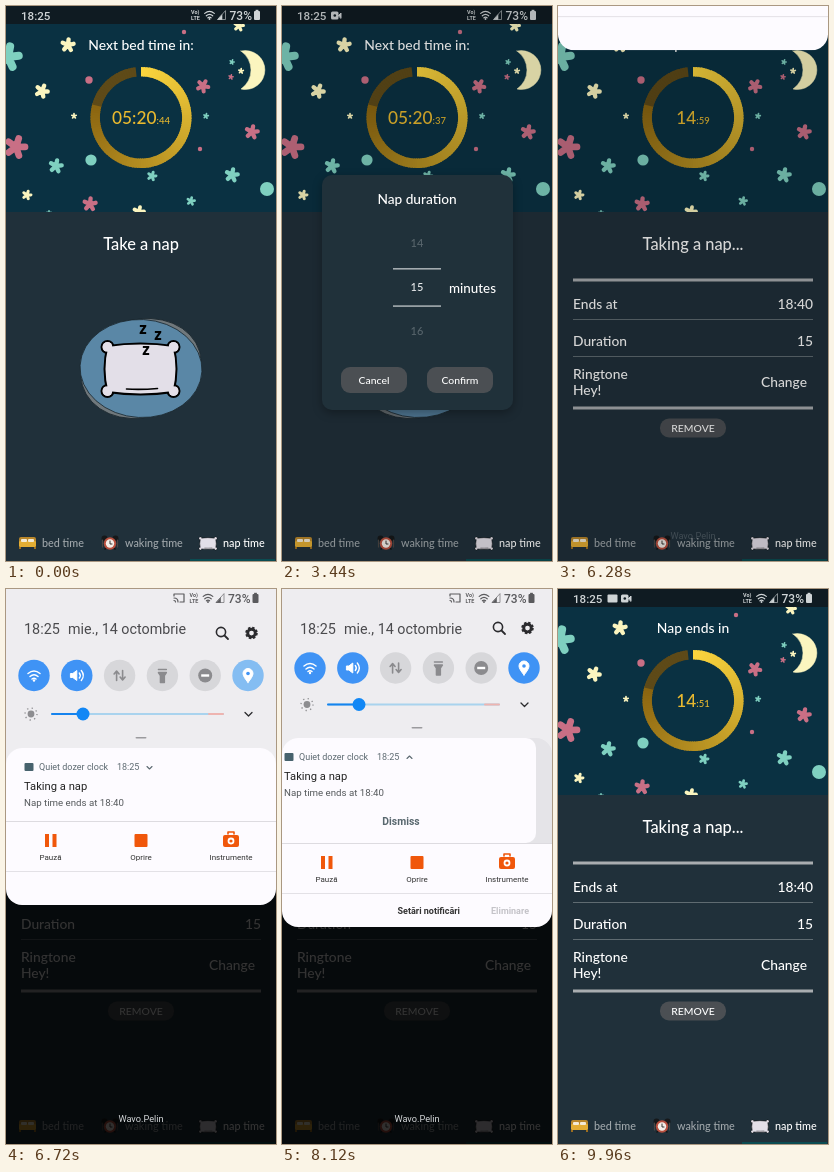
Animation of 270x555 px, one loop 10 s. Source, as an HTML page:

```html
<!DOCTYPE html>
<html lang="en">
<head>
<meta charset="utf-8">
<title>Nap timer</title>
<style>
html, body { margin: 0; width: 100%; height: 100%; overflow: hidden; background: #20303a; }
#stage { display: block; width: 270px; height: 555px; font-family: Lato, sans-serif; font-weight: 500; }
.sys { font-family: Roboto, sans-serif; font-weight: 400; }
.status { font-weight: 500; }
.dialog { filter: drop-shadow(0 3px 5px rgba(0, 0, 0, .3)); }
</style>
</head>
<body>
<svg id="stage" viewBox="0 0 270 555"></svg>
<script>
const LOOP = 10000, SECOND = 480;
const RED = '#c96f85', TEAL = '#7fd0c0', CREAM = '#fbf5bf', ORANGE = '#f0570b', BLUE = '#3f93f5';
const MID = 'text-anchor="middle"', END = 'text-anchor="end"';

// Eased value from a flat list: time, value, time, value, ...
function key(t, ...k) {
  if (t <= k[0]) return k[1];
  for (let i = 2; i < k.length; i += 2) {
    if (t < k[i]) {
      const u = (t - k[i - 2]) / (k[i] - k[i - 2]);
      return k[i - 1] + (k[i + 1] - k[i - 1]) * u * u * (3 - 2 * u);
    }
  }
  return k[k.length - 1];
}

const text = (x, y, s, size, fill = '#fff', more = '') =>
  `<text x="${x}" y="${y}" font-size="${size}" fill="${fill}" ${more}>${s}</text>`;
const rect = (x, y, w, h, fill, r = 0, more = '') =>
  `<rect x="${x}" y="${y}" width="${w}" height="${h}" rx="${r}" fill="${fill}" ${more}/>`;
const circle = (x, y, r, fill, more = '') => `<circle cx="${x}" cy="${y}" r="${r}" fill="${fill}" ${more}/>`;
const path = (d, stroke, w = 1, fill = 'none', more = '') =>
  `<path d="${d}" stroke="${stroke}" stroke-width="${w}" fill="${fill}" stroke-linecap="round" stroke-linejoin="round" ${more}/>`;
const group = (s, more) => `<g ${more}>${s}</g>`;
const at = (x, y, s, k = 1) => group(s, `transform="translate(${x} ${y}) scale(${k})"`);
const fade = (o, s) => o > 0 ? group(s, `opacity="${o}"`) : '';

// Five thick rounded arms
function star(x, y, r, color, turn = 0) {
  let d = '';
  for (let i = 0; i < 5; i++) {
    const a = i * Math.PI * .4 + turn;
    d += `M${x} ${y}L${(x + r * .72 * Math.sin(a)).toFixed(1)} ${(y - r * .72 * Math.cos(a)).toFixed(1)}`;
  }
  return path(d, color, r * .54);
}

const wifi = c => path('M-6 -2Q0 -7 6 -2M-4 1Q0 -2.5 4 1M-2 3.5Q0 2 2 3.5', c, 1.5) + circle(0, 5, 1.2, c);
const camera = c => rect(-5, -4, 7.5, 8, c, 1.5) + path('M2.5 0L5 -2.5V2.5Z', c, 1, c) + circle(-1.2, 0, 1.3, '#0f1b22');

function statusIcons(x, c) {
  return text(x, 8, 'Vo)', 5.4, c, 'font-weight="700"') + text(x, 13.5, 'LTE', 5.4, c, 'font-weight="700"') +
    at(x + 18.5, 9, wifi(c), .8) + path(`M${x + 27} 13.5H${x + 34.5}V5Z`, c, .6) + path(`M${x + 27} 13.5H${x + 31}V9Z`, c, .6, c) +
    text(x + 38.5, 13.5, '73%', 12, c) + rect(x + 63, 5, 6, 9, c, 1) + rect(x + 64.6, 3.8, 2.8, 2, c);
}

const sky = (() => {
  const stars = [
    [2, 51, 15, TEAL, .2], [62, 39, 8, CREAM, .1], [36, 85, 8, CREAM, .4], [233, 20, 6, CREAM, .2],
    [10, 141, 12.5, RED, .3], [50, 160, 8, TEAL, .2], [84, 198, 8, RED, .1], [21, 189, 5.5, CREAM, .3],
    [68, 110, 3.2, CREAM, 0], [197, 80, 7.5, RED, .5], [200, 110, 3.2, TEAL, .2], [246, 126, 8, RED, .2],
    [146, 170, 5.5, TEAL, .3], [226, 169, 8, TEAL, .2], [185, 195, 5, TEAL, .2], [235, 65, 3.2, CREAM, .1],
    [226, 56, 3, TEAL, .3], [225, 71, 3, RED, .2], [133, 206, 7, CREAM, .2], [43, 207, 3, TEAL, 0]];
  const dots = [[178, 26, 2.2, RED], [83, 74, 3.7, RED], [85, 154, 5.6, TEAL], [194, 143, 2.2, RED], [261, 183, 7, TEAL]];
  return `<svg y="18" width="270" height="188" viewBox="0 18 270 188">` + rect(0, 18, 270, 188, '#0a3142') +
    stars.map(s => star(...s)).join('') + dots.map(d => circle(...d)).join('') +
    path('M235 45A19.5 19.5 0 1 1 235 83A23 23 0 0 0 235 45Z', CREAM, .5, CREAM) + '</svg>';
})();

const ring = (() => {
  const point = a => `${(135 + 45.8 * Math.sin(a)).toFixed(2)} ${(111.5 - 45.8 * Math.cos(a)).toFixed(2)}`;
  const light = [251, 213, 62], deep = [138, 100, 16];
  let s = '';
  for (let i = 0; i < 118; i++) {
    const f = i / 120, a = f * 2 * Math.PI;
    const c = f < .79 ? light.map((v, j) => Math.round(v + (deep[j] - v) * f / .79)) : [94, 74, 24];
    const next = a + (i < 117 ? .08 : .05);
    s += `<path d="M${point(a)}A45.8 45.8 0 0 1 ${point(next)}" stroke="rgb(${c})" stroke-width="9.4" fill="none"/>`;
  }
  return s;
})();

const pad = n => String(n).padStart(2, '0');
const clock = (big, sec) =>
  `<text x="135" y="118" font-size="17.3" fill="#e9b92f" ${MID}>${big}<tspan font-size="9.5">:${pad(sec)}</tspan></text>`;

const pillowPath = 'M-33 -23Q0 -28 33 -23Q39 0 33 23Q0 28 -33 23Q-39 0 -33 -23Z';
const corners = (r, stroke, w) => [[-33, -22], [33, -22], [-33, 22], [33, 22]]
  .map(([x, y]) => circle(x, y, r, '#e3dfe8', `stroke="${stroke}" stroke-width="${w}"`)).join('');
const pillow = corners(6, '#000', 2) + path(pillowPath, '#000', 2, '#e3dfe8') + corners(4.8, 'none', 0) +
  path('M-14 20Q0 21 17 19.5', '#000', 1.6);

const nav = (() => {
  const bed = rect(13, 531, 17, 6, '#b9872b', 2) + rect(13, 535, 17, 6, '#e3ad33', 1) +
    rect(15, 533, 6, 3, '#f3ead5', 1) + rect(22, 533, 6, 3, '#f3ead5', 1) + rect(13, 541, 2, 2, '#9b6d20') + rect(28, 541, 2, 2, '#9b6d20');
  const alarm = circle(98.5, 532.5, 3, '#16181a') + circle(109.5, 532.5, 3, '#16181a') +
    path('M99 543L101 541M109 543L107 541', '#111', 1.5) + circle(104, 537.5, 6.2, '#b8503f') + circle(104, 537.5, 4.2, '#f4eee8') +
    path('M104 535V538H106', '#222', .9) + path('M96.5 534V541M111.5 534V541', '#4a4644', 1.2);
  return bed + alarm + at(202, 537.5, pillow, .23) +
    text(36, 541, 'bed time', 10.8, '#a0a7ab') + text(119, 541, 'waking time', 10.8, '#a0a7ab') +
    text(217, 541, 'nap time', 10.8) + rect(184, 553, 85, 2, '#0b4c52');
})();

const napButton = (() => {
  const blob = (turn, fill) => `<ellipse cx="135" cy="362.5" rx="61" ry="49" fill="${fill}" stroke="#1a262d" stroke-width=".8" transform="rotate(${turn} 135 362.5)"/>`;
  const z = (x, y) => text(x, y, 'z', 16, '#000', `${MID} font-weight="900"`);
  return text(135, 244, 'Take a nap', 16.4, '#fff', MID) + blob(-16, '#70787c') + blob(3, '#5a87a6') +
    at(134.5, 363, pillow) + z(137, 328) + z(152, 334) + z(140, 349);
})();

const button = (x, y, w, h, s, size) =>
  rect(x, y, w, h, '#4b4f53', Math.min(h / 2, 9)) + text(x + w / 2, y + h / 2 + 4, s, size, '#fff', MID);

const napPage = text(135, 244, 'Taking a nap...', 16.4, '#fff', MID) +
  rect(15, 272.5, 240, 3, '#a9adb0') + rect(15, 313, 240, 1, '#5f6b71') +
  rect(15, 350, 240, 1, '#5f6b71') + rect(15, 400.5, 240, 3, '#a9adb0') +
  text(15, 303, 'Ends at', 13.8) + text(255, 303, '18:40', 13.8, '#fff', END) +
  text(15, 340, 'Duration', 13.8) + text(255, 340, '15', 13.8, '#fff', END) +
  text(15, 373, 'Ringtone', 13.8) + text(15, 389, 'Hey!', 13.8) + text(249, 381, 'Change', 13.8, '#fff', END) +
  button(102, 412.5, 66, 19, 'REMOVE', 10.4);

// Picker rows are 44 px apart around the chosen value
function durationDialog(t) {
  const value = key(t, 1400, 10, 1640, 10.2, 1920, 10.66, 2240, 12, 2480, 12, 2840, 14, 3040, 14, 3320, 15);
  let rows = '';
  for (let n = Math.floor(value) - 1; n < value + 2; n++) {
    const y = 281 + (n - value) * 44, off = Math.abs(y - 281);
    rows += fade(Math.min(1, Math.max(0, (50 - off) / 16)), text(135, y + 4, n, 11, off < 20 ? '#e8ebec' : '#b3babd', MID));
  }
  return rect(40, 169, 191, 235, '#20313a', 10, 'class="dialog"') + text(135, 198, 'Nap duration', 13.7, '#fff', MID) +
    rows + rect(111, 262, 48, 1.6, '#a3abaf') + rect(111, 299.3, 48, 1.6, '#a3abaf') + text(167, 287, 'minutes', 13.4) +
    button(59, 361, 66, 26, 'Cancel', 10.4) + button(145, 361, 66, 26, 'Confirm', 10.4);
}

const tones = ['Horn', 'All that', 'A new beginning', 'Marvolescu', 'Cig swag', 'Creative minds', 'Dubstep',
  'Funny song', 'Hey!', 'Skull fire', 'Spaceship alarm', 'Summer'];

function toneDialog(t) {
  const chosen = t < 5000 ? 4 : 8;
  const ripple = key(t, 4800, 0, 4900, 1, 5080, 1, 5280, 0);
  const rows = tones.map((s, i) => {
    const y = 156 + 24 * i, on = i == chosen;
    const touch = i == 8 ? fade(ripple, circle(80, y, 15, '#3b4a51') + circle(80, y, 7, '#14232b')) : '';
    const ringColor = i == 8 && ripple > .5 && !on ? '#22333b' : '#b9c0c4';
    return touch + circle(80, y, 7, 'none', `stroke="${ringColor}" stroke-width="1.5"`) +
      (on ? circle(80, y, 6, '#c6cacc') : '') + text(92, y + 5, s, 14.9);
  }).join('');
  return rect(57.5, 107, 154.5, 359, '#20313a', 10, 'class="dialog"') +
    text(135, 132.5, 'Choose a ringtone', 16.5, '#fff', MID) + rows +
    circle(134.5, 446, 13.5, '#8e9395') + path('M128.5 446.5L132.5 450.5L141 441.5', '#fff', 2);
}

const popup = (o, y, s) => o > 0
  ? group(s, `opacity="${o}" transform="translate(135 ${y}) scale(${.9 + .1 * o}) translate(-135 ${-y})"`) : '';

function quickTiles(y, e) {
  const g = '#8b8b8e';
  const glyphs = [
    wifi('#fff'),
    path('M-6 -2H-4L0 -5V5L-4 2H-6Z', '#fff', 1, '#fff') + path('M2.5 -2.5Q4.5 0 2.5 2.5M4.5 -5Q8.5 0 4.5 5', '#fff', 1.4),
    path('M-3 5V-4M-5.5 -1.5L-3 -4.5L-.5 -1.5M3 -5V4M.5 1.5L3 4.5L5.5 1.5', g, 1.6),
    path('M-4 -6H4M-4 -3H4L2 0V7H-2V0Z', g, 1.4, g),
    circle(0, 0, 7, g) + rect(-4, -1.2, 8, 2.4, '#fff'),
    path('M0 7Q-5 1 -5 -2A5 5 0 0 1 5 -2Q5 1 0 7Z', '#fff', 1, '#fff') + circle(0, -2, 1.8, BLUE)];
  return glyphs.map((s, i) => {
    const fill = i > 1 && i < 5 ? '#d7d7da' : i == 5 && e > .5 ? '#84bdf2' : BLUE;
    return at(28 + 42.8 * i, y, circle(0, 0, 15.7, fill) + s);
  }).join('');
}

function notification(h, collapse, dx, up) {
  const y = -4 * collapse, c = '#5d6a71';
  const chevron = up ? 'M141 20.5L143.5 18L146 20.5' : 'M141 18.5L143.5 21L146 18.5';
  const body = rect(0, 0, 270, h, '#fdfbff', dx ? 10 : 0) + at(0, y,
    rect(18.5, 15, 9, 8, '#47626d', 1) + text(33, 22, 'Quiet dozer clock', 9, c) + text(111, 22, '18:25', 9, c) +
    path(chevron, c, 1.1) + text(18, 42, 'Taking a nap', 11.2, '#222') + text(18, 58, 'Nap time ends at 18:40', 9.7, '#55595c') +
    fade(Math.max(0, Math.min(1, (h - 80) / 20)), text(135, 87, 'Dismiss', 10.4, '#58676e', `${MID} font-weight="700"`)));
  return rect(0, 0, 270, h, '#e5e4e8') + at(dx, 0, body);
}

function recorder(collapse, footer) {
  const label = (x, s) => text(x, 39, s, 8, '#333', MID);
  const controls = rect(39, 13, 4, 13, ORANGE) + rect(46.5, 13, 4, 13, ORANGE) + rect(128.5, 13, 13, 13, ORANGE, 1) +
    rect(217, 14, 16, 12, ORANGE, 2) + path('M222 13V11H228V13', ORANGE, 1.6) +
    circle(225, 20, 3.4, '#fff') + circle(225, 20, 1.6, ORANGE) +
    label(44.5, 'Pauză') + label(135, 'Oprire') + label(225, 'Instrumente') + rect(0, 50, 270, 1, '#e3e1e6') +
    fade(footer, text(178, 70.5, 'Setări notificări', 9, '#333', `${END} font-weight="700"`) +
      text(247, 70.5, 'Eliminare', 9, '#c4c3c8', `${END} font-weight="700"`));
  return rect(0, 0, 270, 90, '#fdfbff') + rect(0, 0, 270, 1, '#dddbe0') +
    fade(1 - collapse, controls) + fade(collapse, at(32, 17.5, camera('#4f5e66'), .9));
}

function shade(t) {
  const open = key(t, 6120, 0, 6680, 1, 9540, 1, 9690, 0);
  if (!open) return '';
  const e = key(t, 6760, 1, 7040, 0);
  const expand = key(t, 7680, 0, 7920, 1);
  const collapse = key(t, 9260, 0, 9500, 1);
  const dx = key(t, 7980, 0, 8120, -16, 8240, -30, 8520, 0);
  const top = 149 + 10 * e;
  const h1 = 73 + 32 * expand - 64 * collapse, h2 = 84 - 50 * collapse;
  const ink = '#2b2b2e', sy = 115.5 + 9.5 * e, iy = 39 + 5 * e;
  const gear = circle(0, 0, 4, 'none', `stroke="${ink}" stroke-width="3"`) +
    circle(0, 0, 5.6, 'none', `stroke="${ink}" stroke-width="2" stroke-dasharray="2.6 1.8"`);
  const header = group(statusIcons(183.5, '#5a5a5d'), 'class="status"') +
    path('M168 7V5H178V13H174M168 9Q172 9 172 13M168 11.5Q169.5 11.5 169.5 13', '#5a5a5d', 1.2) +
    text(18, 45, '18:25', 14.4, '#4a4a4d') + text(62, 45, 'mie., 14 octombrie', 14.3, '#4a4a4d') +
    circle(216 - e, iy - 1, 4.6, 'none', `stroke="${ink}" stroke-width="1.6"`) +
    path(`M${219.5 - e} ${iy + 2.5}L${223 - e} ${iy + 6}`, ink, 1.8) + at(245.5, iy, gear, .95) +
    quickTiles(79 + 7.5 * e, e) +
    circle(25, sy, 3.4, '#8d8d90') + circle(25, sy, 6, 'none', 'stroke="#8d8d90" stroke-width="1.3" stroke-dasharray="1.3 3.4"') +
    rect(45, sy - 1, 173, 2, '#a9d3ee', 1) + rect(202, sy - 1, 16, 2, '#eeb4b0', 1) + rect(45, sy - 1, 32, 2, '#1583ee', 1) +
    circle(77, sy, 6.5, '#1187f5') + path(`M239 ${sy - 1.5}L242.5 ${sy + 2}L246 ${sy - 1.5}`, ink, 1.3) +
    rect(129.5, 138 + 10 * e, 11, 1.6, '#9a9a9d', 1);
  const cards = `<clipPath id="card"><rect y="${top}" width="270" height="${h1 + h2}" rx="16"/></clipPath>` +
    group(`<svg y="${top}" width="270" height="${h1}">${notification(h1, collapse, dx, expand > .5)}</svg>` +
      `<svg y="${top + h1}" width="270" height="${h2}">${recorder(collapse, expand)}</svg>`, 'clip-path="url(#card)"');
  return rect(0, 0, 270, 555, '#000', 0, `opacity="${.8 * open}"`) +
    fade(open, text(135, 533, 'Wavo.Pelin', 9.2, '#d5d8da', `class="sys" ${MID} font-weight="500"`)) +
    group(rect(0, -40, 270, top + 60, '#eeedf0') + header + cards,
      `class="sys" transform="translate(0 ${-340 * (1 - open)})"`);
}

const NAP_SET = 3840, NAP_START = 5600;

function timer(t) {
  if (t < NAP_SET) return clock('05:20', 44 - Math.floor((t + 260) / SECOND));
  if (t < NAP_START) return clock('00', 0);
  const left = 900 - Math.floor((t - NAP_START) / SECOND);
  return clock(pad(Math.floor(left / 60)), left % 60);
}

function scene(t) {
  const first = key(t, 560, 0, 760, 1, 3560, 1, 3760, 0);
  const second = key(t, 4000, 0, 4240, 1, 5560, 1, 5740, 0);
  const c = '#cfd4d6', posted = t >= NAP_START;
  const status = rect(0, 0, 270, 18, '#0f1b22') + group(text(15, 13.5, '18:25', 11.6, c) + statusIcons(185, c) +
    (posted ? rect(49.5, 5.5, 10, 8, c, 1) : '') + (t >= 520 ? at(posted ? 68 : 54, 9.5, camera(c)) : ''), 'class="sys status"');
  return rect(0, 0, 270, 555, '#20303a') + sky + ring +
    text(135, 44, t < NAP_SET ? 'Next bed time in:' : 'Nap ends in', 13.9, '#fff', MID) + timer(t) +
    (posted ? napPage : napButton) + nav + status +
    rect(0, 0, 270, 555, '#000', 0, `opacity="${.14 * Math.max(first, second)}"`) +
    popup(first, 286, durationDialog(t)) + popup(second, 286, toneDialog(t)) + shade(t);
}

const stage = document.getElementById('stage');
const start = performance.now();
function draw() {
  stage.innerHTML = scene((performance.now() - start) % LOOP);
  requestAnimationFrame(draw);
}
draw();
</script>
</body>
</html>
```
